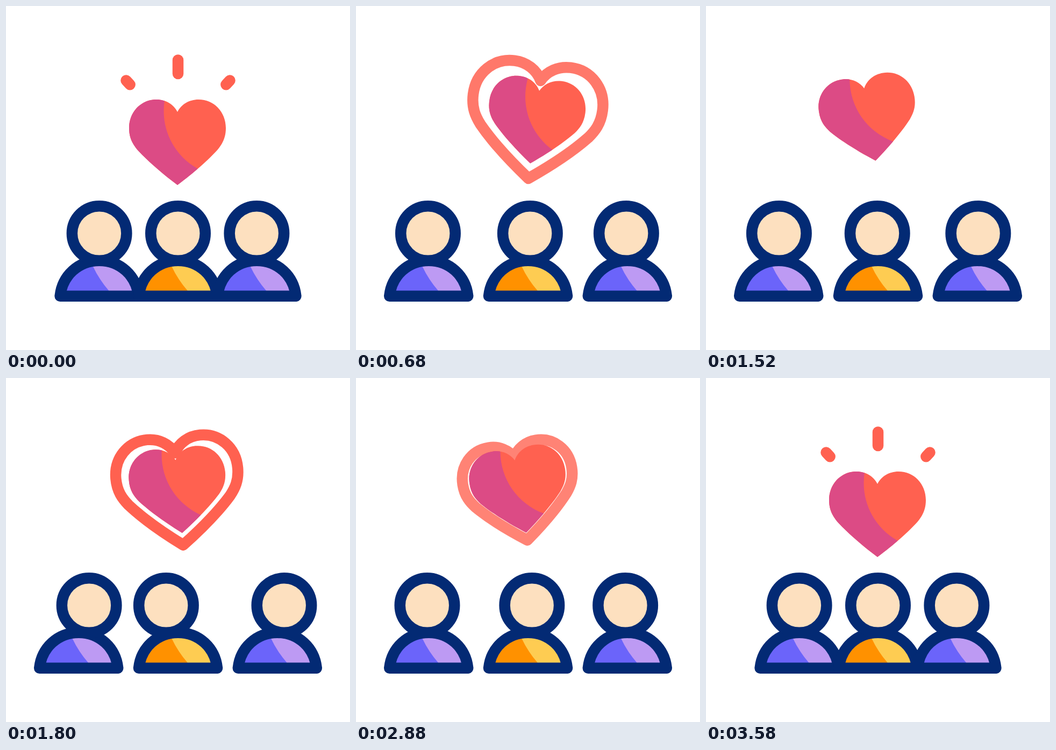
Animation, 640 px wide and 640 px high, one loop 3.6 s. Source, as an HTML page:

```html
<!DOCTYPE html>
<html lang="en">
<head>
<meta charset="utf-8">
<title>Community</title>
<style>
  html, body { margin: 0; width: 100%; height: 100%; overflow: hidden; background: #fff; }
  svg { display: block; width: 100vw; height: 100vh; }
</style>
</head>
<body>
<svg viewBox="0 0 640 640" fill="none" stroke-width="20.5" stroke-linecap="round" stroke-linejoin="round">
  <defs>
    <path id="heart"/>
    <path id="torso" d="M-73 539.7C-69 502-39 473.7 0 473.7S69 502 73 539.7Z"/>
    <clipPath id="inHeart"><use href="#heart"/></clipPath>
    <clipPath id="inTorso"><use href="#torso"/></clipPath>
  </defs>
  <g id="people"></g>
  <g id="love">
    <use id="ripple" href="#heart" stroke="#ff6150"/>
    <use href="#heart" fill="#ff6150"/>
    <path d="M-22-100L-24-89C-32-37-7 13 38 38L40 80H-100V-100Z" fill="#dc4b85" clip-path="url(#inHeart)"/>
  </g>
  <g id="rays" stroke="#ff6150"></g>
</svg>
<script>
const LOOP = 3600, BEAT = 640, PULSE = 1200;
const SVG = 'http://www.w3.org/2000/svg';
const $ = id => document.getElementById(id);
const clamp = v => Math.min(1, Math.max(0, v));
const ramp = (t, a, b) => clamp((t - a) / (b - a));
const smooth = u => u * u * (3 - 2 * u);
const ease = (t, a, b) => smooth(ramp(t, a, b));
const cubic = u => u < 0.5 ? 4 * u ** 3 : 1 - 4 * (1 - u) ** 3;
const mix = (a, b, u) => a + (b - a) * u;

// right half of the heart from notch to tip; the left half is its mirror
const half = [[0, -68], [7, -82], [22, -91], [39, -91], [68, -91], [90, -68], [90, -38],
  [90, -19], [83, -8], [75, 2], [59, 20], [31, 45], [0, 68]];
const mirrored = half.slice(0, -1).reverse().map(([x, y]) => [-x, y]);
$('heart').setAttribute('d', `M${half[0]}C${[...half.slice(1), ...mirrored].join(' ')}Z`);

// from 0 to 1, then back and forth between 1 and -1
function sway(t, begin) {
  const u = Math.max(0, (t - begin) / BEAT), k = Math.floor(u);
  const to = k % 2 ? -1 : 1;
  return mix(k ? -to : 0, to, cubic(u - k));
}

// lean one way, then the other, back upright, short rest, again
function nod(t, { begin, beat, first, second }) {
  const u = Math.max(0, t - begin) % 2130 / beat, k = Math.floor(u);
  const stops = [0, first, second, 0, 0];
  return mix(stops[k], stops[k + 1], smooth(u - k));
}

const purple = { dark: '#6b64fa', light: '#bd9af3' };
const people = [
  { ...purple, side: -1, begin: 550, beat: 680, first: -13, second: 21.8 },
  { dark: '#ff9100', light: '#fecc52', side: 0, begin: 525, beat: 645, first: 26, second: -22.2 },
  { ...purple, side: 1, begin: 525, beat: 645, first: -13, second: 12.7 }
];

for (const p of people) {
  p.body = document.createElementNS(SVG, 'g');
  p.body.innerHTML = `
    <use href="#torso" fill="${p.light}"/>
    <path d="M-14 470L-12 484Q-1 508 18 530L26 540H-80V470Z" fill="${p.dark}" clip-path="url(#inTorso)"/>
    <use href="#torso" stroke="#032a74"/>
    <circle cy="423" r="50.75" fill="#fde0bf" stroke="#032a74"/>`;
  p.head = p.body.querySelector('circle');
  $('people').append(p.body);
}

// strokes pointing away from (cx, cy), between two radii
function ray(cx, cy, degrees, inner, outer) {
  const el = document.createElementNS(SVG, 'path');
  const a = degrees * Math.PI / 180;
  $('rays').append(el);
  return { el, inner, outer, at: r => `${cx + r * Math.cos(a)} ${cy + r * Math.sin(a)}` };
}
const crown = [-133, -90, -47].map(a => ray(320, 242, a, a === -90 ? 116 : 131, 141.5));
const right = [-57, -3.6].map(a => ray(537, 392, a, 39.5, 64));
const left = [-172.6, -118.5].map(a => ray(119.5, 380.3, a, 39.5, 64));

// shows the part of each ray between fractions a and b
function trim(rays, a, b, shown) {
  for (const { el, inner, outer, at } of rays) {
    el.setAttribute('d', `M${at(mix(inner, outer, a))}L${at(mix(inner, outer, b))}`);
    el.setAttribute('visibility', shown ? 'visible' : 'hidden');
  }
}

function burst(rays, t, begin) {
  const peak = begin + 135, end = begin + 268;
  trim(rays, ease(t, peak, end), ease(t, begin, peak), t >= begin && t < end + 15);
}

function draw(t) {
  const leave = ease(t, 2885, 3450), stay = 1 - leave;
  const spread = ease(t, 210, 670) - leave;
  for (const p of people) {
    p.body.setAttribute('transform', `translate(${320 + p.side * mix(146.4, 184.8, spread)} 0)`);
    p.head.setAttribute('cx', nod(t, p) * stay);
  }

  const x = 319 + 14.2 * sway(t, 180) * stay;
  const y = 265 - 44.5 * (ease(t, 215, 800) - leave);
  $('love').setAttribute('transform', `translate(${x} ${y}) rotate(${9 * sway(t, 280) * stay})`);

  const age = t % PULSE;
  const size = 0.993 + 0.00104 * Math.max(0, age - 340);
  const glow = ramp(age, 340, 520) * (1 - ramp(age, 640, 915)) * (1 - ramp(t, 2895, 2960));
  const ripple = $('ripple');
  ripple.setAttribute('transform', `translate(0 4.6) scale(${size})`);
  ripple.setAttribute('stroke-width', 20.5 / size);
  ripple.setAttribute('opacity', glow);

  trim(crown, t < LOOP / 2 ? ease(t, 210, 400) : 0, t < LOOP / 2 ? 1 : ease(t, 3360, 3500), t < 410 || t >= 3360);
  burst(right, t, 1035);
  burst(left, t, 2110);
}

const start = performance.now();
function tick(now) {
  draw(Math.max(0, now - start) % LOOP);
  requestAnimationFrame(tick);
}
draw(0);
requestAnimationFrame(tick);
</script>
</body>
</html>
```
